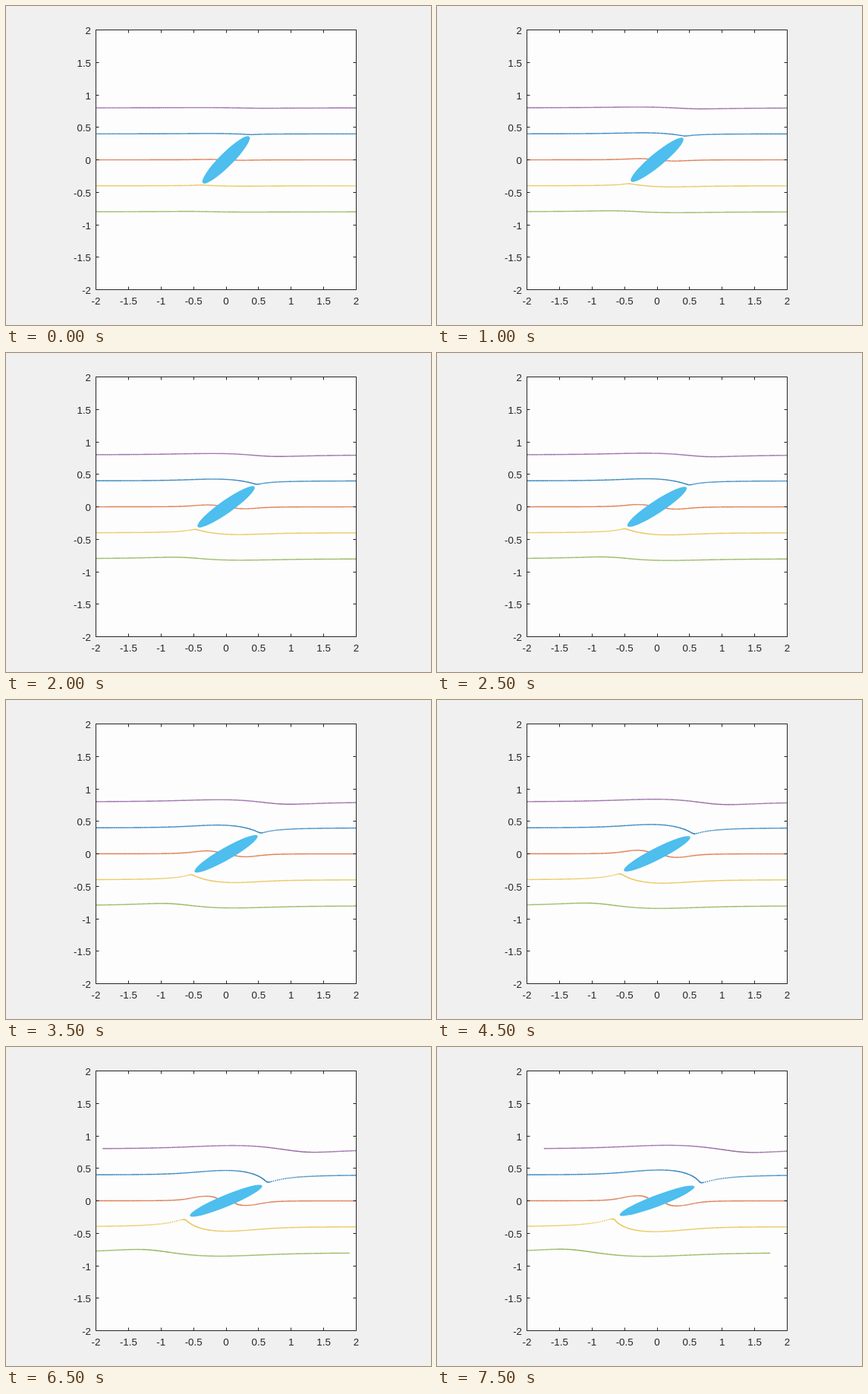
Animation, 560 px wide and 420 px high, one loop 8000 ms. Source, as an HTML page:

```html
<!DOCTYPE html>
<html lang="en">
<head>
<meta charset="utf-8">
<title>Stiff ellipse in shear flow</title>
<style>
  html, body { margin: 0; width: 100%; height: 100%; overflow: hidden; background: #f0f0f0; }
  svg { display: block; width: 560px; height: 420px; }
  text { font: 13.33px "Liberation Sans", Arial, sans-serif; fill: #262626; }
</style>
</head>
<body>
<svg id="stage" viewBox="0 0 560 420">
  <defs><clipPath id="plot"><rect x="118" y="31" width="344" height="343"/></clipPath></defs>
  <rect x="118" y="31" width="344" height="343" fill="#fdfdfe"/>
</svg>
<script>
const SCALE_X = 85.75, SCALE_Y = 85.5, CX = 290, CY = 202.5;
const FRAMES = 16, FRAME_MS = 500, DT = 0.1;
const VISCOSITY_RATIO = 10;
const LINES = [[0.8, '#9a6aa4'], [0.4, '#3585bd'], [0, '#de7648'], [-0.4, '#e9c658'], [-0.8, '#96b75e']];

const stage = document.getElementById('stage');
const px = x => CX + x * SCALE_X;
const py = y => CY - y * SCALE_Y;

function add(tag, attrs, parent = stage) {
  const node = document.createElementNS('http://www.w3.org/2000/svg', tag);
  for (const key in attrs) node.setAttribute(key, attrs[key]);
  return parent.appendChild(node);
}

// Complex numbers as [re, im]
const plus = (p, q) => [p[0] + q[0], p[1] + q[1]];
const minus = (p, q) => [p[0] - q[0], p[1] - q[1]];
const times = (p, q) => [p[0] * q[0] - p[1] * q[1], p[0] * q[1] + p[1] * q[0]];
const conj = p => [p[0], -p[1]];
const scaled = (p, s) => [p[0] * s, p[1] * s];
const over = (p, q) => scaled(times(p, conj(q)), 1 / (q[0] * q[0] + q[1] * q[1]));
const polar = t => [Math.cos(t), Math.sin(t)];
function root(p) {
  const r = Math.hypot(...p);
  const im = Math.sqrt(Math.max(0, (r - p[0]) / 2));
  return [Math.sqrt(Math.max(0, (r + p[0]) / 2)), p[1] < 0 ? -im : im];
}

// Strain rates in the axes of the ellipse, and their change inside it
function innerFlow({ a, b, angle }) {
  const R = a / b, m = VISCOSITY_RATIO, k = (R * R - 1) / (R * R + 1);
  const en = Math.sin(2 * angle) / 2, es = Math.cos(2 * angle) / 2;
  const enIn = en * (R + 1) ** 2 / (R * R + 2 * m * R + 1);
  const esIn = es * (R + 1) ** 2 / (m * (R * R + 1) + 2 * R);
  const spin = k * (es - esIn);
  return { D: [enIn - en, esIn - es], spin, stretch: enIn, turn: -0.5 + spin + esIn / k };
}

// Stokes flow disturbance around the ellipse, by conformal mapping
function disturbance(z, { a, b }, { D, spin }) {
  if ((z[0] / a) ** 2 + (z[1] / b) ** 2 <= 1) return plus(times(D, conj(z)), times([0, spin], z));
  const c = (a + b) / 2, lam = (a - b) / (a + b);
  let s = root(minus(times(z, z), [a * a - b * b, 0]));
  if (s[0] * z[0] + s[1] * z[1] < 0) s = scaled(s, -1);
  const zeta = scaled(plus(z, s), 1 / (2 * c));
  const zeta2 = times(zeta, zeta), den = minus(zeta2, [lam, 0]);
  const A = [c * D[0], c * (D[1] + spin * lam)];
  const phi = over(A, zeta);
  const dPhi = scaled(over(A, den), -1 / c);
  const psi = plus(
    over(times(A, plus([1, 0], scaled(zeta2, lam))), times(zeta, den)),
    over([-c * lam * D[0], c * (spin + lam * D[1])], zeta));
  return minus(minus(phi, times(z, conj(dPhi))), conj(psi));
}

function advect(p, ellipse, flow) {
  const local = times(p, polar(-ellipse.angle));
  const v = times(disturbance(local, ellipse, flow), polar(ellipse.angle));
  return [p[0] + DT * (p[1] + v[0]), p[1] + DT * v[1]];
}

function simulate() {
  const states = [];
  let ellipse = { a: 0.5, b: 0.1, angle: Math.PI / 4 };
  let tracers = LINES.map(([y]) => Array.from({ length: 301 }, (_, i) => [-3 + i * 0.02, y]));
  for (let i = 0; i < FRAMES; i++) {
    const now = ellipse, flow = innerFlow(now);
    tracers = tracers.map(line => line.map(p => advect(p, now, flow)));
    states.push({
      ellipse: now,
      paths: tracers.map(line => line.map(([x, y]) => `M${px(x).toFixed(2)} ${py(y).toFixed(2)}h0`).join(''))
    });
    const grow = 1 + DT * flow.stretch;
    ellipse = { a: now.a * grow, b: now.b / grow, angle: now.angle + DT * flow.turn };
  }
  return states;
}

const plot = add('g', { 'clip-path': 'url(#plot)' });
const lineNodes = LINES.map(([, color]) =>
  add('path', { fill: 'none', stroke: color, 'stroke-width': 1.7, 'stroke-linecap': 'round' }, plot));
const body = add('ellipse', { fill: '#4dbeee' }, plot);

function drawAxes() {
  let d = 'M118.5 31.5H461.5V373.5H118.5Z';
  for (let v = -2; v <= 2; v += 0.5) {
    const x = Math.floor(px(v)) + 0.5, y = Math.floor(py(v)) + 0.5;
    d += `M${x} 373.5v-4M${x} 31.5v4M118.5 ${y}h4M461.5 ${y}h-4`;
    add('text', { x: px(v), y: 393, 'text-anchor': 'middle' }).textContent = v;
    add('text', { x: 112, y: py(v) + 5.5, 'text-anchor': 'end' }).textContent = v;
  }
  add('path', { d, fill: 'none', stroke: '#262626' });
}

const states = simulate();
let shown = -1;
function render(time) {
  const index = Math.floor(time / FRAME_MS) % FRAMES;
  if (index === shown) return;
  shown = index;
  const { ellipse, paths } = states[index];
  paths.forEach((d, i) => lineNodes[i].setAttribute('d', d));
  body.setAttribute('rx', ellipse.a * SCALE_X + 0.4);
  body.setAttribute('ry', ellipse.b * SCALE_Y + 0.4);
  body.setAttribute('transform', `translate(${CX} ${CY}) rotate(${-ellipse.angle * 180 / Math.PI})`);
}

drawAxes();
render(0);
const start = performance.now();
(function tick() {
  render(performance.now() - start);
  requestAnimationFrame(tick);
})();
</script>
</body>
</html>
```
